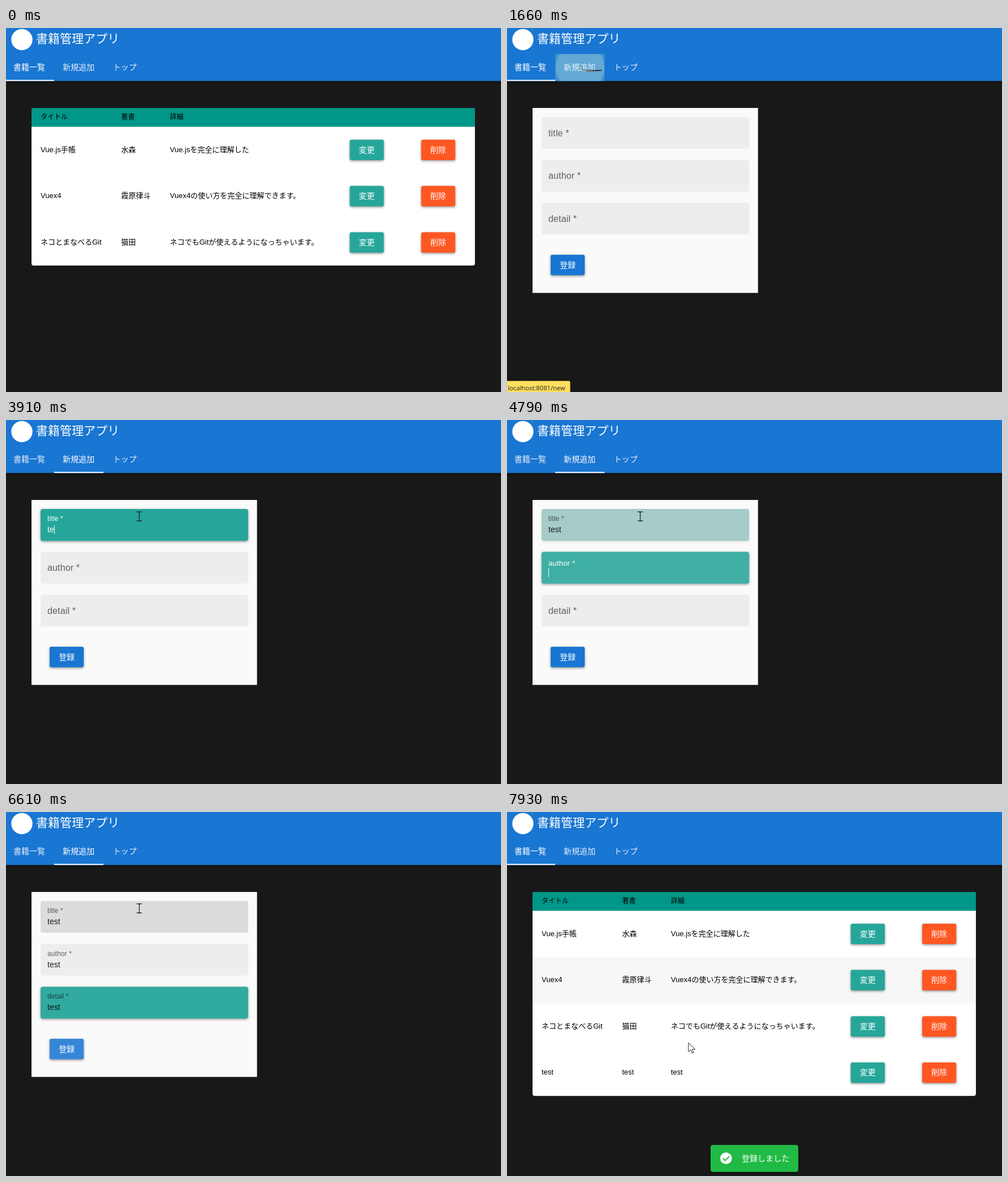
These frames come from a looping animation (873x642 px, 8000 ms). An HTML page with a canvas:

```html
<!DOCTYPE html>
<html lang="ja">
<head>
<meta charset="utf-8">
<style>
html, body { margin: 0; width: 100%; height: 100%; overflow: hidden; background: #181818; }
canvas { display: block; }
</style>
</head>
<body>
<canvas id="stage" width="873" height="642"></canvas>
<script>
const ctx = document.getElementById('stage').getContext('2d');
const LOOP = 8000, ROW = 81.6, FIELD = 75.6;
const BLUE = '#1976d2', TEAL = [38, 166, 154], TEAL_CSS = '#26a69a', ORANGE = '#ff5722';
const FONT = '"Liberation Sans", "Noto Sans CJK JP", "Noto Sans CJK", sans-serif';

const FORM_OPEN = 1600, LIST_BACK = 6750;
const books = [
  ['Vue.js手帳', '水森', 'Vue.jsを完全に理解した'],
  ['Vuex4', '霞原律斗', 'Vuex4の使い方を完全に理解できます。'],
  ['ネコとまなべるGit', '猫田', 'ネコでもGitが使えるようになっちゃいます。'],
  ['test', 'test', 'test']
];
const fields = [
  { label: 'title *', on: 2610, off: 4630, keys: [[3110, 't'], [3380, 'te'], [3510, 'tes'],
    [3910, 'te'], [4050, 't'], [4110, 'te'], [4310, 'tes'], [4450, 'test']] },
  { label: 'author *', on: 4630, off: 5560, keys: [[4930, 't'], [5070, 'te'], [5270, 'tes'], [5420, 'test']] },
  { label: 'detail *', on: 5560, off: 6560, keys: [[5840, 't'], [5920, 'te'], [6060, 'tes'], [6200, 'test']] }
];
// time, x, y of the pointer tip
const pointerPath = [
  [120, 616, 500], [190, 575, 390], [250, 520, 279], [450, 520, 279], [520, 219, 46], [590, 187, 2],
  [780, 187, 2], [910, 125, 48], [980, 106, 60], [1050, 131, 67], [2280, 131, 67], [2540, 235, 170],
  [7240, 235, 170], [7600, 285, 235], [7930, 320, 407]
];

const clamp = v => Math.max(0, Math.min(1, v));
const lerp = (a, b, p) => a + (b - a) * p;
const span = (t, start, length) => clamp((t - start) / length);
const mix = (a, b, p) => a.map((v, i) => lerp(v, b[i], p));
const during = (t, a, b) => t >= a && t < b;

// cubic-bezier(.4, 0, .2, 1)
function ease(x) {
  let lo = 0, hi = 1;
  for (let i = 0; i < 16; i++) {
    const s = (lo + hi) / 2, r = 1 - s;
    if (1.2 * r * r * s + 0.6 * r * s * s + s * s * s < x) lo = s; else hi = s;
  }
  return lo * lo * (3 - 2 * lo);
}

function text(str, x, y, size, color = '#000', family = FONT, spacing = 0) {
  ctx.font = `${size}px ${family}`;
  ctx.letterSpacing = spacing + 'px';
  ctx.fillStyle = color;
  ctx.fillText(str, x, y);
}

function box(x, y, w, h, color, radius = 0, shadow = 0) {
  ctx.save();
  if (shadow) {
    ctx.shadowColor = `rgba(0,0,0,${shadow})`;
    ctx.shadowBlur = 4;
    ctx.shadowOffsetY = 1.5;
  }
  ctx.fillStyle = color;
  ctx.beginPath();
  ctx.roundRect(x, y, w, h, radius);
  ctx.fill();
  ctx.restore();
}

function disc(x, y, r, color) {
  ctx.fillStyle = color;
  ctx.beginPath();
  ctx.arc(x, y, r, 0, 7);
  ctx.fill();
}

function button(label, x, y, color) {
  box(x, y, 60, 36, color, 3, 0.45);
  text(label, x + 16, y + 22.6, 14, '#fff');
}

function drawHeader(t) {
  box(0, 0, 873, 93.5, BLUE, 0, 0.5);
  disc(28, 20.5, 18.7, '#fff');
  text('書籍管理アプリ', 53, 26, 21, '#fff');

  if (during(t, 1530, 2200)) {
    ctx.save();
    ctx.beginPath();
    ctx.rect(85, 46, 87, 47.5);
    ctx.clip();
    ctx.globalAlpha = 1 - span(t, 1900, 300);
    box(85, 46, 87, 48, '#3f94d0');
    ctx.globalAlpha *= 1 - span(t, 1750, 250);
    disc(129, 69, lerp(8, 44, ease(span(t, 1530, 170))), '#62a9d5');
    ctx.restore();
  }

  const slide = ease(span(t, 1690, 250)) - ease(span(t, LIST_BACK + 30, 250));
  const tabColor = active => `rgba(255,255,255,${lerp(0.88, 1, active)})`;
  text('書籍一覧', 13, 74, 14, tabColor(1 - slide));
  text('新規追加', 100, 74, 14, tabColor(slide));
  text('トップ', 188.5, 74, 14, tabColor(0));
  box(lerp(0, 85, slide), 91.5, lerp(85, 87, slide), 2, '#fff');
}

function drawList(t) {
  const count = t >= LIST_BACK ? 4 : 3;
  const hovered = during(t, 120, 250) ? 2 : during(t, 7450, 7780) ? 0 : t >= 7780 ? 1 : -1;
  box(45, 141, 782, 33.3 + ROW * count, '#fff', 4);
  box(45, 141, 782, 33.3, '#009688', [4, 4, 0, 0]);
  ['タイトル', '著書', '詳細'].forEach((s, i) => text(s, [61, 203, 289][i], 161, 12));
  books.slice(0, count).forEach((book, i) => {
    const y = 174.3 + i * ROW;
    if (i === hovered) box(45, y, 782, ROW, '#f7f7f7', i === count - 1 ? [0, 0, 4, 4] : 0);
    book.forEach((s, col) => text(s, [61, 203, 289][col], y + 44.3, 13));
    button('変更', 606.3, y + 22.7, TEAL_CSS);
    button('削除', 732.3, y + 22.7, ORANGE);
  });
}

function drawField(field, index, t) {
  const dy = index * FIELD;
  const hover = index === 0 ? span(t, 2480, 120) : 0;
  const grey = Array(3).fill(lerp(237, 220, hover));
  const focused = during(t, field.on, field.off);
  const tint = t < field.off ? ease(span(t, field.on, 270)) : 1 - ease(span(t, field.off, 360));
  box(61, 157 + dy, 366, 56, `rgb(${mix(grey, TEAL, tint)})`, 4, tint * 0.45);

  const float = ease(span(t, field.on, 360));
  const size = lerp(16, 12, float);
  text(field.label, 73, lerp(190.5, 178, float) + dy, size,
    focused ? '#fff' : 'rgba(0,0,0,.6)', FONT, size * 0.0094);

  let value = '';
  for (const [time, typed] of field.keys) if (t >= time) value = typed;
  text(value, 73, 198 + dy, 14, focused ? '#fff' : 'rgba(0,0,0,.87)');
  if (focused) box(Math.round(73 + ctx.measureText(value).width), Math.round(186 + dy), 1, 15, '#fff');
}

function drawForm(t) {
  box(45, 141, 397.7, 326.3, '#fafafa');
  fields.forEach((field, i) => drawField(field, i, t));
  const flash = t >= 6540 ? 0.12 * (1 - span(t, 6650, 150)) : 0;
  button('登録', 77, 400, `rgb(${mix([25, 118, 210], [255, 255, 255], flash)})`);
}

function drawStatus(t) {
  if (!during(t, 1230, 2420)) return;
  ctx.globalAlpha = 1 - span(t, 2220, 200);
  box(0, 622.5, 111.5, 20, '#ffdf5d', [0, 3, 0, 0]);
  text('localhost:8081/new', 1.5, 638.5, 11.2, '#222', '"Open Sans", "Noto Sans", sans-serif');
  ctx.globalAlpha = 1;
}

function drawNotice(t) {
  const p = ease(span(t, 7240, 300));
  if (!p) return;
  ctx.save();
  ctx.globalAlpha = p;
  ctx.translate(0, 50 * (1 - p));
  box(359, 587.3, 154.7, 47.5, '#21ba45', 4, 0.4);
  disc(386.3, 610.8, 10.3, '#fff');
  ctx.strokeStyle = '#21ba45';
  ctx.lineWidth = 2;
  ctx.stroke(new Path2D('M381 611l3.8 3.8 7.2-7.4'));
  text('登録しました', 414, 616, 14, '#fff');
  ctx.restore();
}

const arrow = new Path2D('M0 0V16L4 12.4 6.6 18.5 9.2 17.4 6.6 11.5H11.8Z');
const hand = new Path2D('M-1.5 1Q0-1 1.5 1V7Q3 5.5 4.5 7.5 6-6.2 7 8.3 9.5 7 9.5 10V15L7.5 20.5H-1L-5.5 13Q-5-10.5-1.5 13Z'
  .replace('-6.2', '6.2').replace('-10.5', ' 10.5'));
const beam = new Path2D('M-4.5-8H-1Q0-8 0-7 0-8 1-8H4.5M0-7V7M-4.5 8H-1Q0 8 0 7 0 8 1 8H4.5');

function drawPointer(t) {
  if (t < pointerPath[0][0]) return;
  let i = 1;
  while (i < pointerPath.length - 1 && t > pointerPath[i][0]) i++;
  const [t0, x0, y0] = pointerPath[i - 1], [t1, x1, y1] = pointerPath[i];
  const p = span(t, t0, t1 - t0), x = lerp(x0, x1, p), y = lerp(y0, y1, p);

  if (during(t, 2600, 2840)) return disc(x - 1.5, y - 0.7, 12, 'rgba(191,212,60,.8)');
  if (during(t, 1460, 1570)) disc(x, y, 12, 'rgba(230,220,60,.65)');

  ctx.save();
  ctx.translate(x, y);
  ctx.lineJoin = 'round';
  ctx.lineWidth = 1;
  ctx.strokeStyle = '#222';
  ctx.fillStyle = '#fff';
  if (during(t, FORM_OPEN, LIST_BACK) && y > 157) {
    ctx.lineWidth = 1.3;
    ctx.stroke(beam);
  } else {
    const shape = during(t, 1050, 2300) ? hand : arrow;
    ctx.fill(shape);
    ctx.stroke(shape);
  }
  ctx.restore();
}

function draw(now) {
  const t = now % LOOP;
  box(0, 0, 873, 642, '#181818');
  drawHeader(t);
  if (during(t, FORM_OPEN, LIST_BACK)) drawForm(t); else drawList(t);
  drawStatus(t);
  drawNotice(t);
  drawPointer(t);
  requestAnimationFrame(draw);
}
requestAnimationFrame(draw);
</script>
</body>
</html>
```
